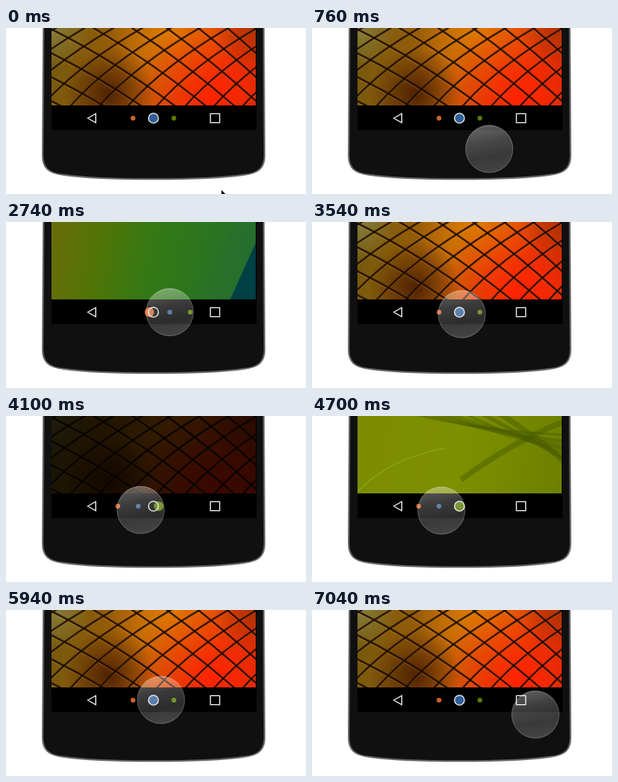
Animation of 376 by 208 pixels, one loop 7.08 s. Source, as an HTML page with a canvas:

```html
<!DOCTYPE html>
<html lang="en">
<head>
<meta charset="utf-8">
<title>Navigation bar swipe</title>
<style>
  html, body { margin: 0; width: 100%; height: 100%; overflow: hidden; background: #fff; }
  canvas { display: block; }
</style>
</head>
<body>
<canvas id="stage" width="376" height="208"></canvas>
<script>
const LOOP = 7080;
const SCREEN = { x: 57, y: 0, w: 256, h: 97 };
const CENTER = { x: 184.8, y: 113 };
const SPACING = 25.6;
const ctx = document.getElementById('stage').getContext('2d');

const clamp = v => Math.max(0, Math.min(1, v));
const ramp = (t, from, to) => clamp((t - from) / (to - from));
const ease = (t, from, to) => {
  const u = ramp(t, from, to);
  return u * u * (3 - 2 * u);
};

function gradient(c, points, colors) {
  const g = points.length === 4 ? c.createLinearGradient(...points) : c.createRadialGradient(...points);
  colors.forEach((color, i) => g.addColorStop(i / (colors.length - 1), color));
  return g;
}

function wallpaper(colors, paint) {
  const canvas = document.createElement('canvas');
  canvas.width = SCREEN.w;
  canvas.height = SCREEN.h;
  const c = canvas.getContext('2d');
  c.fillStyle = gradient(c, [0, 25, SCREEN.w, 75], colors);
  c.fillRect(0, 0, SCREEN.w, SCREEN.h);
  paint(c);
  return canvas;
}

function glow(c, x, y, r, color) {
  c.fillStyle = gradient(c, [x, y, 0, x, y, r], [color, color.slice(0, 7) + '00']);
  c.fillRect(0, 0, SCREEN.w, SCREEN.h);
}

function curve(c, x1, y1, cx, cy, x2, y2) {
  c.beginPath();
  c.moveTo(x1, y1);
  c.quadraticCurveTo(cx, cy, x2, y2);
  c.stroke();
}

const tiles = wallpaper(['#73590f', '#925c08', '#c26508', '#e04a08', '#d03008'], c => {
  glow(c, 0, 0, 50, '#8c8848cc');
  glow(c, 155, 8, 80, '#df8000dd');
  glow(c, 205, 88, 105, '#ff2200ff');
  glow(c, 72, 82, 58, '#3c1200cc');
  glow(c, 256, 0, 55, '#9a3000aa');
  const grid = (width, color, shift) => {
    c.lineWidth = width;
    c.strokeStyle = color;
    for (let i = -8; i < 10; i++) {
      const y = i * 30 + shift, x = i * 36 + shift;
      curve(c, -20, y - 8, 130, y + 62, 276, y + 200);
      curve(c, x - 20, 107, x + 35, 40, x + 150, -20);
    }
  };
  grid(1, '#ffb04040', 2);
  grid(2.4, '#1c0c04d8', 0);
});

const facets = wallpaper(['#6b7009', '#507809', '#347c16', '#2c7722', '#286f30'], c => {
  const corner = (x, y, color) => {
    c.fillStyle = color;
    c.beginPath();
    c.moveTo(x, SCREEN.h);
    c.lineTo(SCREEN.w, y);
    c.lineTo(SCREEN.w, SCREEN.h);
    c.fill();
  };
  corner(176, -40, '#24703830');
  corner(224, 26, '#004148');
});

const leaf = wallpaper(['#7c8c02', '#7d9000', '#6d8000'], c => {
  c.strokeStyle = '#44580070';
  for (let i = 0; i < 6; i++) {
    c.lineWidth = 3 + i % 3 * 2;
    curve(c, 50 + i * 24, -8, 150 + i * 18, 20 + i * 3, 270, 24 + i * 9);
  }
  c.lineWidth = 7;
  curve(c, 130, 80, 190, 35, 256, 8);
  c.lineWidth = 1.2;
  c.strokeStyle = '#91aa15';
  curve(c, 0, 95, 38, 54, 110, 40);
});

// Each swipe drags the dots aside, rests, then drags them home.
const swipes = [
  { start: 1380, arrive: 1580, leave: 2580, home: 3140, side: 1, image: facets },
  { start: 3780, arrive: 4260, leave: 5160, home: 5555, side: -1, image: leaf }
];

// The wallpaper changes in darkness just before a drag ends.
const swaps = swipes.flatMap(s => [
  { time: s.arrive - 85, image: s.image },
  { time: s.home - 85, image: tiles }
]);

function dragAt(t) {
  return swipes.reduce((sum, s) =>
    sum + s.side * SPACING * (ease(t, s.start, s.arrive) - ease(t, s.leave, s.home)), 0);
}

function drawWallpaper(t) {
  const past = swaps.filter(s => s.time <= t).pop();
  const light = swaps.map(({ time }) => t < time ? ramp(time - t, 0, 320) : ramp(t - time, 0, 450));
  ctx.globalAlpha = Math.min(...light);
  ctx.drawImage(past ? past.image : tiles, SCREEN.x, SCREEN.y);
  ctx.globalAlpha = 1;
}

function drawPhone() {
  ctx.beginPath();
  ctx.moveTo(47, -4);
  ctx.lineTo(46, 160);
  ctx.bezierCurveTo(46, 175, 53, 182, 72, 184);
  ctx.bezierCurveTo(120, 191, 250, 191, 298, 184);
  ctx.bezierCurveTo(317, 182, 324, 175, 324, 160);
  ctx.lineTo(323, -4);
  ctx.closePath();
  ctx.fillStyle = '#101010';
  ctx.fill();
  ctx.lineWidth = 2;
  ctx.strokeStyle = '#666';
  ctx.stroke();
  ctx.fillStyle = '#000';
  ctx.fillRect(SCREEN.x, 0, SCREEN.w + 1, 128);
}

function disc(x, y, r, color) {
  ctx.beginPath();
  ctx.arc(x, y, r, 0, Math.PI * 2);
  ctx.fillStyle = color;
  ctx.fill();
}

function drawDots(offset) {
  ['#cb632c', '#315f98', '#587c00'].forEach((color, i) => {
    const shift = (i - 1) * SPACING + offset;
    const radius = 3 + 3 * clamp((14.5 - Math.abs(shift)) / 4);
    disc(CENTER.x + shift, CENTER.y, radius, color);
  });
}

function drawFinger(t, offset) {
  const away = 1 - ease(t, 40, 1350);
  const exit = ease(t, 5900, 6560);
  const settle = ease(t, 3000, 3540);
  const regrip = ease(t, 4940, 5340);
  const x = CENTER.x + offset + 3 * settle + 5.5 * regrip + 88 * away + 86.7 * exit;
  const y = 115.5 - offset * .12 - 3 * regrip + 85 * away + 18.5 * exit;
  disc(x, y, 30, gradient(ctx, [x - 6, y - 30, x + 6, y + 30],
    ['#ffffff5c', '#ffffff3c', '#ffffff2c', '#ffffff38']));
  ctx.beginPath();
  ctx.arc(x, y, 29.5, 0, Math.PI * 2);
  ctx.lineWidth = 1;
  ctx.strokeStyle = '#ffffff30';
  ctx.stroke();
}

function drawIcons() {
  ctx.strokeStyle = '#f4f4f4';
  ctx.lineWidth = 1.3;
  ctx.beginPath();
  ctx.moveTo(102.5, 113);
  ctx.lineTo(112.5, 107.3);
  ctx.lineTo(112.5, 118.7);
  ctx.closePath();
  ctx.rect(256.2, 107.3, 11.6, 11.4);
  ctx.moveTo(CENTER.x + 6.2, CENTER.y);
  ctx.arc(CENTER.x, CENTER.y, 6.2, 0, Math.PI * 2);
  ctx.stroke();
}

function drawCursor(x, y) {
  ctx.fillStyle = '#000';
  ctx.beginPath();
  ctx.moveTo(x, y);
  ctx.lineTo(x, y + 15);
  ctx.lineTo(x + 10, y + 10);
  ctx.fill();
}

function draw(t) {
  const offset = dragAt(t);
  ctx.fillStyle = '#fff';
  ctx.fillRect(0, 0, 376, 208);
  drawPhone();
  drawWallpaper(t);
  drawDots(offset);
  if (t < 40) drawCursor(270, 203);
  else drawFinger(t, offset);
  drawIcons();
}

const start = performance.now();
function tick() {
  draw((performance.now() - start) % LOOP);
  requestAnimationFrame(tick);
}
tick();
</script>
</body>
</html>
```
